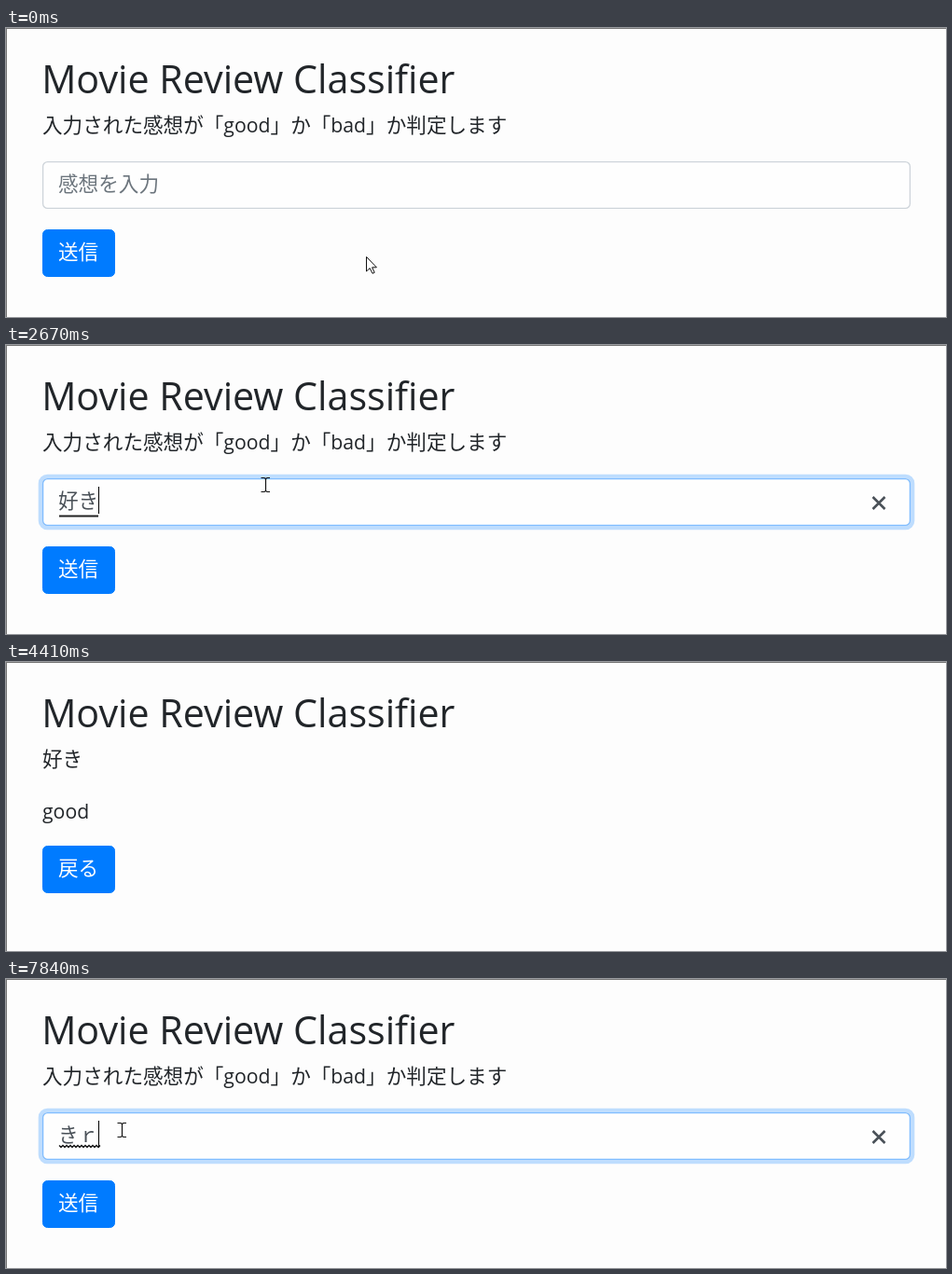
An HTML page for the animation above (7990 ms loop, 1008 px wide and 310 px high).

```html
<!DOCTYPE html>
<html lang="ja">
<meta charset="utf-8">
<title>Movie Review Classifier</title>
<style>
  html, body { margin: 0; width: 100%; height: 100%; overflow: hidden; background: #fdfdfd; }
  svg { display: block; width: 100vw; height: 100vh; }
  text {
    font: 350 21.6px "Noto Sans CJK JP", "Noto Sans CJK", sans-serif;
    fill: #212529; white-space: pre;
  }
  .latin { font: 400 21.2px "Open Sans", sans-serif; font-variant-ligatures: none; }
  .title { font-size: 41.2px; }
</style>
<svg id="stage" viewBox="0 0 1008 310"></svg>
<script>
const LOOP = 7990, EM = 21.6;
const stage = document.getElementById('stage');

const arrow = (x, y) => ({ cursor: ['arrow', x, y] });
const beam = (x, y) => ({ cursor: ['beam', x, y] });
const hand = (x, y) => ({ cursor: ['hand', x, y] });
const typing = (text, line = 'wavy') => ({ text, line, caret: 1 });

// Each step changes part of the state and holds until the next one.
const steps = [
  [0, { page: 'form', hint: 1, focus: 0, press: 0, hover: 0, text: '', line: '', caret: 0, ...arrow(386, 245) }],
  [460, arrow(366, 228)],
  [610, arrow(304, 196)],
  [760, beam(278, 145)],
  [910, { ...beam(278, 147), hint: 0, focus: 1, caret: 1 }],
  [1200, { ...beam(278, 150), caret: .4 }],
  [1350, { caret: 0 }],
  [1810, { caret: .85 }],
  [1960, typing('ｓ')],
  [2110, typing('す')],
  [2260, typing('すｋ')],
  [2410, typing('すき')],
  [2670, typing('好き', 'thick')],
  [2820, typing('好き', '')],
  [2970, beam(278, 153)],
  [3120, beam(275, 164)],
  [3270, beam(262, 184)],
  [3430, { ...arrow(235, 208), caret: .25 }],
  [3580, { ...arrow(168, 227), caret: 0 }],
  [3730, { ...hand(102, 238), hover: 1 }],
  [3850, { ...hand(95, 241), focus: .4, press: .5 }],
  [4000, { focus: 0, press: 1 }],
  [4150, { page: 'result', press: 0, hover: 0, ...arrow(112, 264) }],
  [4410, { cursor: null }],
  [4710, arrow(441, 292)],
  [4860, arrow(352, 270)],
  [5010, arrow(215, 243)],
  [5160, { ...hand(108, 224), hover: 1 }],
  [5300, { ...hand(95, 221), press: .5 }],
  [5440, { press: 1 }],
  [5880, { page: 'form', hint: 1, press: 0, hover: 0, text: '', ...arrow(98, 220) }],
  [6180, arrow(113, 198)],
  [6330, beam(124, 162)],
  [6610, { hint: 0, focus: .3, caret: 1 }],
  [6740, { focus: 1 }],
  [7010, { caret: .4 }],
  [7160, { caret: 0 }],
  [7570, typing('ｋ')],
  [7840, typing('きｒ')],
];

const label = (x, y, body, fill = '#212529') => `<text x="${x}" y="${y}" style="fill:${fill}">${body}</text>`;
const latin = word => `<tspan class="latin">${word}</tspan>`;

function glow(x, y, w, h, amount, opacity) {
  const s = 4.3 * amount;
  return `<rect x="${x - s / 2}" y="${y - s / 2}" width="${w + s}" height="${h + s}" rx="${5.4 + s / 2}"
    fill="none" stroke="#007bff" stroke-opacity="${opacity * amount}" stroke-width="${s}"/>`;
}

function button(y, caption, { press, hover }) {
  return glow(39, y, 78, 51, press, .5) +
    `<rect x="39.5" y="${y + .5}" width="77" height="50" rx="5"
      fill="${hover ? '#0069d9' : '#007bff'}" stroke="${hover ? '#0062cc' : '#007bff'}"/>` +
    label(56, y + 32, caption, '#fff');
}

function field({ focus, hint, text, line, caret }) {
  const frame = (color, opacity) => `<rect x="39.6" y="143.6" width="929.8" height="49.8" rx="5"
    fill="#fefefe" stroke="${color}" stroke-width="1.3" opacity="${opacity}"/>`;
  const n = text.length, end = 56 + Math.floor(n * EM), top = n ? 152 : 154;
  let out = glow(39, 143, 931, 51, focus, .25) + frame('#ced4da', 1) + frame('#80bdff', focus);
  if (hint) out += label(56, 175, '感想を入力', '#6c757d');
  if (n) out += label(56, 175, text, '#495057') +
    '<path d="M929.5 163l13 13m0-13l-13 13" stroke="#495057" stroke-width="2.5"/>';
  if (line == 'wavy') out += `<path d="M57 178.5${'l2 2l2-2'.repeat(Math.round(n * EM / 4))}" fill="none" stroke="#111" stroke-width="1.3"/>`;
  if (line == 'thick') out += `<path d="M57 183.5H${end}" stroke="#222" stroke-width="2"/>`;
  return out + `<path d="M${end + .5} ${top}v29" stroke="#000" stroke-opacity="${caret}"/>`;
}

const shapes = {
  arrow: '<path d="M.5 .5V16L4.2 12.6L7 18.3L9.2 17.3L6.6 11.8H11.4Z" fill="#fff" stroke="#111"/>',
  beam: '<path d="M-4.5-7.5h3.5l1.5 1l1.5-1h3M-4.5 7.5h3.5l1.5-1l1.5 1h3M.5-7V7" fill="none" stroke="#111" stroke-width="1.2"/>',
  hand: `<path d="M-2 12.5V1.5q1.9-2.5 3.8 0V7q2-1 3 .8q2-.9 2.6.8q2-.5 2.2 1.4V14.5l-2 3.5V20.5H-1V18L-6 12q.8-2.5 4 .5Z"
    fill="#fff" stroke="#111"/>`,
};

function draw(state) {
  let out = '<path d="M0 .5H1008M.5 0V310" stroke="#777"/>' +
    '<text x="38.2" y="70" class="latin title">Movie Review Classifier</text>';
  if (state.page == 'form') {
    out += label(39, 112, `入力された感想が「${latin('good')}」か「${latin('bad')}」か判定します`) +
      field(state) + button(216, '送信', state);
  } else {
    out += label(39, 112, '好き') + label(39, 168, latin('good')) + button(197, '戻る', state);
  }
  if (state.cursor) {
    const [kind, x, y] = state.cursor;
    out += `<g transform="translate(${x} ${y})">${shapes[kind]}</g>`;
  }
  stage.innerHTML = out;
}

let shown = 0;
function tick() {
  const t = performance.now() % LOOP;
  const past = steps.filter(([start]) => start <= t);
  if (past.length != shown) {
    shown = past.length;
    draw(Object.assign({}, ...past.map(([, change]) => change)));
  }
  requestAnimationFrame(tick);
}
tick();
</script>
</html>
```
